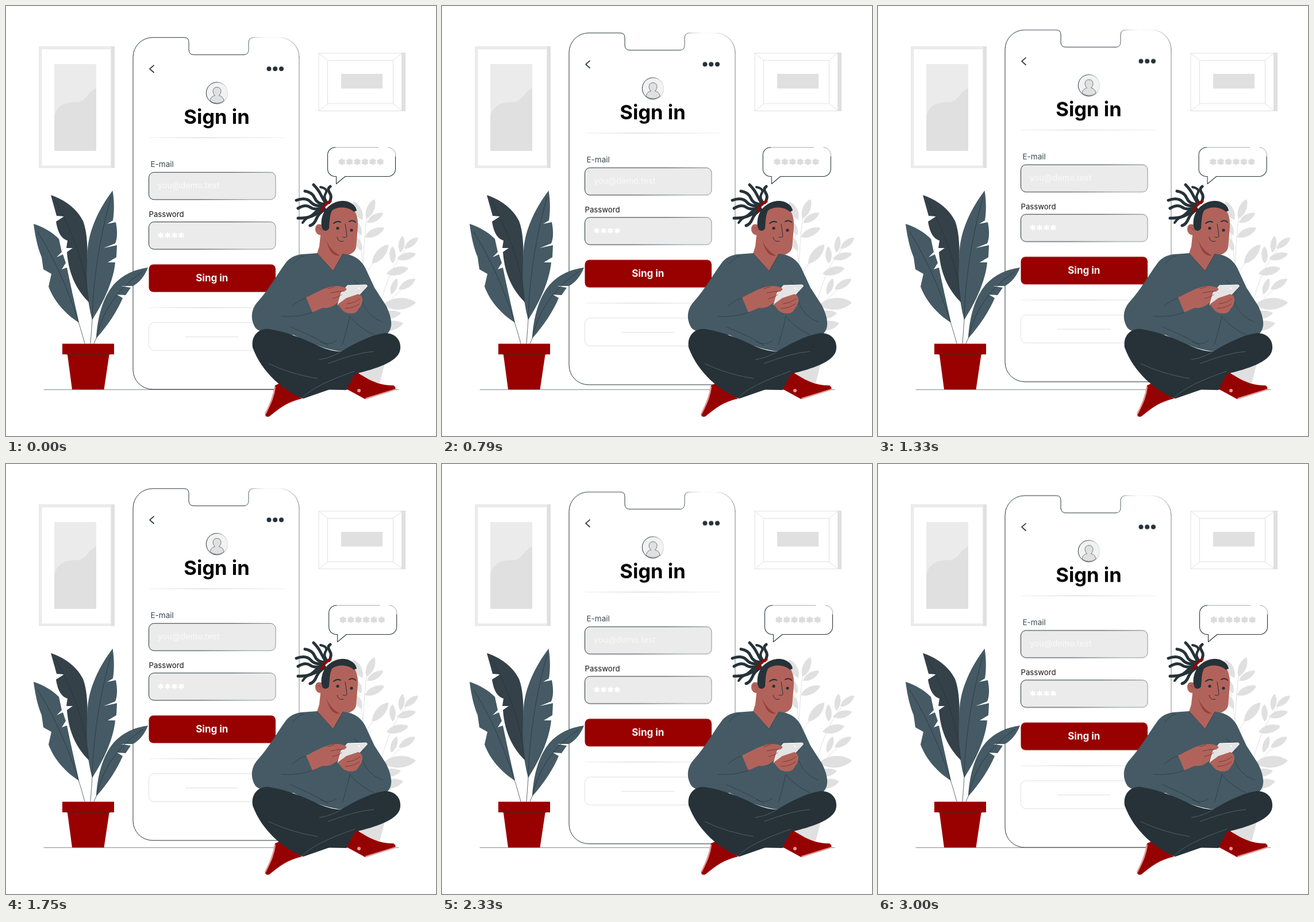
Recreate the animation shown at these times as an HTML page. Size 748 by 748 pixels, loop 3040 ms.

```html
<!DOCTYPE html>
<html lang="en">
<head>
<meta charset="utf-8">
<title>Sign in</title>
<style>
  html, body { margin: 0; width: 100%; height: 100%; overflow: hidden; background: #fff; }
  svg { display: block; width: 748px; height: 748px; font-family: Inter, "Open Sans", sans-serif; }
  .ink { fill: none; stroke: #263238; stroke-linecap: round; stroke-linejoin: round; }
  .thin { stroke-width: .8; }
  .dark { fill: #263238; }
  .slate { fill: #455a64; }
  .red { fill: #900; }
  .skin { fill: #b1635b; }
  .pale { fill: #ebebeb; }
  .grey { fill: #e0e0e0; }
  .rule { fill: none; stroke: #e0e0e0; stroke-width: 1; }
  #device { animation: float 3040ms linear infinite; }
  #bubble { animation: shake 3040ms linear infinite; }
  @keyframes float {
    0% { transform: translateY(-.18px); }
    48.75% { transform: translateY(-14.96px); }
    98.09%, 100% { transform: translateY(0); }
  }
  /* two shakes of 1.5 s each */
  @keyframes shake {
    0%, 48.75%, 98.09%, 100% { transform: translateX(0); }
    4.34%, 43.82%, 53.68%, 93.16% { transform: translateX(-1.5px); }
    9.28%, 38.88%, 58.62%, 88.22% { transform: translateX(3px); }
    14.21%, 24.08%, 33.95%, 63.55%, 73.42%, 83.29% { transform: translateX(-6px); }
    19.14%, 29.01%, 68.49%, 78.36% { transform: translateX(6px); }
  }
</style>
</head>
<body>
<svg viewBox="0 0 748 748">
  <defs>
    <linearGradient id="fadeTop" gradientUnits="userSpaceOnUse" x1="422" y1="0" x2="510" y2="0">
      <stop offset="0" stop-color="#263238"/><stop offset=".15" stop-color="#263238" stop-opacity=".35"/>
      <stop offset=".35" stop-color="#263238" stop-opacity=".04"/><stop offset=".6" stop-color="#263238" stop-opacity=".08"/>
      <stop offset="1" stop-color="#263238" stop-opacity=".75"/>
    </linearGradient>
    <linearGradient id="fadeField" x1="0" y1="0" x2="1" y2=".25">
      <stop offset=".6" stop-color="#263238"/><stop offset="1" stop-color="#263238" stop-opacity=".5"/>
    </linearGradient>
    <linearGradient id="fadeFace" x1="0" y1=".5" x2="1" y2=".4">
      <stop offset=".4" stop-color="#263238"/><stop offset="1" stop-color="#263238" stop-opacity=".1"/>
    </linearGradient>
    <linearGradient id="fadeRule" gradientUnits="userSpaceOnUse" x1="249" y1="0" x2="483" y2="0">
      <stop offset="0" stop-color="#ccc" stop-opacity=".3"/><stop offset=".4" stop-color="#ccc"/>
      <stop offset="1" stop-color="#ccc" stop-opacity=".3"/>
    </linearGradient>
    <path id="star" d="M0-5V5M-4.600-2.600L4.600 2.600M-4.600 2.600L4.600-2.600"/>
  </defs>

  <!-- wall pictures -->
  <path class="grey" d="M57 70h132v212H57z"/>
  <path class="pale" d="M57 70h126v212H57z"/>
  <path fill="#fff" d="M62.500 75.500H182V277.500H62.500z"/>
  <path class="pale" d="M84 101h73v151H84z"/>
  <path class="grey" d="M157 143C146 148 142 158 135 163C124 172 106 162 92 177Q85 184 84 194V252H157z"/>
  <path class="grey" d="M688 81h7v102h-7z"/>
  <path class="rule" d="M544 82H689V182.500H544zM559.500 94.500H673.500V170H559.500zM544 82L559.500 94.500M689 82L673.500 94.500M544 182.500L559.500 170M689 182.500L673.500 170"/>
  <path class="grey" d="M583 118h72v25.500h-72z"/>

  <path class="ink thin" opacity=".75" d="M66 667.300H683"/>

  <g id="device">
    <path fill="#fff" d="M255 55H310Q318 55 318 63V76Q318 85 327 85H414Q422 85 422 76V64Q422 55 431 55H476A34 34 0 0 1 510 89V633A34 34 0 0 1 476 667H255A34 34 0 0 1 221 633V89A34 34 0 0 1 255 55z"/>
    <path class="ink" stroke-width="1" d="M480 667H255A34 34 0 0 1 221 633V89A34 34 0 0 1 255 55H310Q318 55 318 63V76Q318 85 327 85H414"/>
    <path class="ink thin" d="M414 85Q422 85 422 76V64Q422 55 431 55H476A34 34 0 0 1 510 89" style="stroke:url(#fadeTop)"/>
    <path class="ink thin" opacity=".75" d="M510 89V633A34 34 0 0 1 476 667"/>

    <path class="ink" stroke-width="1.700" d="M257 103.500L250 109.500L257 115.700"/>
    <g class="dark"><circle cx="457.500" cy="109.500" r="4"/><circle cx="468.200" cy="109.500" r="4"/><circle cx="479" cy="109.500" r="4"/></g>

    <circle cx="367" cy="151.500" r="18.700" fill="#f2f2f2" stroke="url(#fadeFace)" stroke-width="1"/>
    <path class="grey" stroke="#263238" stroke-width=".6" d="M355 165.500C356 159 359 157 363.500 156C358 151 359 141.500 367 141.500S376 151 370.500 156C375 157 378 159 379 165.500Q367 173.500 355 165.500z"/>
    <text x="366.500" y="205.500" font-size="34.600" font-weight="700" text-anchor="middle">Sign in</text>
    <path d="M249 228.700H483V229.700H249z" fill="url(#fadeRule)"/>

    <text x="251.500" y="280" font-size="13.500" fill="#37474f">E-mail</text>
    <rect class="pale" x="248.500" y="289.500" width="220.500" height="47.500" rx="9" stroke="url(#fadeField)"/>
    <text x="264" y="317.500" font-size="14.500" fill="#fafafa">you@demo.test</text>
    <text x="248.500" y="367" font-size="13.200" fill="#111">Password</text>
    <rect class="pale" x="248.500" y="375.800" width="220.500" height="47.500" rx="9" stroke="url(#fadeField)"/>
    <g id="dots" stroke="#fff" stroke-width="2.400"></g>

    <rect class="red" x="248.500" y="449.700" width="220.500" height="48" rx="8"/>
    <text x="358.300" y="479" font-size="17" font-weight="700" fill="#fff" text-anchor="middle">Sing in</text>
    <path d="M249 524.500H483V525.500H249z" fill="url(#fadeRule)"/>
    <rect class="rule" x="248.500" y="551" width="220.500" height="48.500" rx="9"/>
    <path class="rule" d="M312 575.700H404"/>
  </g>

  <!-- potted plant -->
  <path fill="#344149" d="M78 329C102 337 123 352 134 374C142 394 143 430 141 468L145 516C126 498 109 470 106 428L116 421L105 421L107 408C97 405 90 395 87 375L101 366L88 365C85 353 82 344 78 329z"/>
  <path class="slate" d="M48 379C64 384 80 393 92 405L97 428L88 437L99 432L104 447L97 458L106 455C112 485 119 515 127 551C104 536 84 515 74 488L79 466L65 458L62 437C55 420 51 402 48 379z"/>
  <path class="slate" d="M185.500 321C189 342 188 361 186 373L176 379L191 376C194 391 194 404 190 413L170 421L193 416L192 437L177 446L190 446C187 478 170 515 150 546C140 510 139 470 142 425C144 390 162 352 185.500 321z"/>
  <path class="slate" d="M247 455C241 470 232 481 221 487L200 487L217 490L208 503L193 502L203 508C194 530 177 556 157 578C159 542 168 508 187 485C203 467 224 458 247 455z"/>
  <g class="ink" stroke-width=".7">
    <path d="M55 393C85 440 115 505 137 587"/>
    <path d="M85 338C115 390 138 450 144 515"/>
    <path d="M183 332C163 400 151 480 150 546L147 587"/>
    <path d="M238 462C195 490 168 530 157 578L153 587"/>
  </g>
  <path class="red" d="M106 600H180.500L170.500 667H115z"/>
  <path class="red" d="M98 587.500H188V606H98z"/>
  <path class="ink thin" d="M106 606H181"/>

  <!-- pale plant -->
  <path class="grey" d="M612 618H660L650 656H622z"/>
  <path class="rule" d="M632 640C618 560 616 440 630 350M640 600C645 520 665 450 709 408M642 570C650 530 675 498 706 482M622 460C617 420 615 390 606 360M624 470Q640 440 664 422"/>
  <g id="leaves" class="grey"></g>

  <g id="bubble">
    <path fill="#fff" d="M572.500 246H664.500A13 13 0 0 1 677.500 259V283.500A13 13 0 0 1 664.500 296.500H590L574.500 309.500V296.500H572.500A13 13 0 0 1 559.500 283.500V259A13 13 0 0 1 572.500 246z"/>
    <path class="ink" stroke-width="1.100" d="M677.500 262V283.500A13 13 0 0 1 664.500 296.500H590L574.500 309.500V296.500H572.500A13 13 0 0 1 559.500 283.500V259A13 13 0 0 1 572.500 246"/>
    <path class="ink thin" opacity=".55" d="M572.500 246H648M665 246A13 13 0 0 1 677.500 262"/>
    <g id="secret" stroke="#dcdcdc" stroke-width="3.300"></g>
  </g>

  <!-- seated man -->
  <g class="ink" stroke-width="5">
    <path d="M557 345Q551 335 547 327T535 311"/>
    <path d="M560 343Q551 334 556 326T547 315" stroke-width="4"/>
    <path d="M562 342Q568 332 563 325T564 314"/>
    <path d="M554 345Q541 344 537 334T520 322"/>
    <path d="M553 347Q538 350 530 341T505 338"/>
    <path d="M553 350Q537 356 529 350T508 352"/>
    <path d="M553 352Q542 354 535 362T508 369"/>
    <path d="M555 354Q544 360 540 370T529 382"/>
    <path d="M554 353Q536 366 529 367T516 377" stroke-width="4"/>
  </g>

  <path class="skin" d="M549 380L545 418L541 431L569 462L588 432z"/>
  <path class="skin" d="M552 370C557 351 577 344 597 348C608 353 613 367 612 385L609 420C607 431 592 437 576 433C563 428 555 410 552 393z"/>
  <path fill="#8f3a32" d="M557 407C562 420 571 429 581 434C571 436 563 430 557 407z" opacity=".8"/>
  <path class="skin" d="M552 383C546 377 538 379 538 388C538 396 545 401 553 397z"/>
  <path class="ink thin" d="M542 386Q547 384 549 391" opacity=".5"/>
  <path class="dark" d="M549 384C546 361 560 342 583 339C597 338 609 346 610 356L605 358C594 348 576 349 567 356C563 364 563 374 562 387Q557 394 551 389z"/>
  <path d="M549 358Q553 344 566 339" fill="none" stroke="#900" stroke-width="4.500"/>
  <g class="ink">
    <path d="M570 378Q576 373 582 376M597 375Q603 371 608 376" stroke-width="2"/>
    <path d="M590 379Q592 392 593 401Q590 404 586 402M576 402Q578 412 587 409" stroke-width="1"/>
  </g>
  <circle class="dark" cx="577" cy="386.500" r="2.600"/><circle class="dark" cx="601" cy="390" r="2.600"/>

  <path class="red" d="M479 655L515 683C490 688 474 701 458 714Q451 716 451 710C457 696 464 681 468 660z"/>
  <path d="M468 662C466 682 457 697 451 710" fill="none" stroke="#e29a97" stroke-width="2.500"/>
  <path class="red" d="M608 635L592 666L625 684L676 668Q680 664 674 660C652 661 630 651 608 635z"/>
  <path d="M625 683L677 667" stroke="#e29a97" stroke-width="2"/>
  <g class="ink" stroke-width="1" stroke-dasharray="3 4" opacity=".8">
    <path d="M475 669L497 686M470 680L487 691M464 691L474 699"/>
    <path d="M611 645L605 671M622 650L617 676M634 656L628 680M646 660L640 676M657 662L652 672"/>
  </g>
  <circle cx="490" cy="663" r="3" fill="#e29a97"/><circle cx="614" cy="669" r="3" fill="#e29a97"/>

  <path class="slate" d="M541 430L569 461L586 431C604 432 620 441 628 462L641 490L661 521C672 543 674 561 662 571L583 601Q545 596 500 572C472 573 445 571 434 560C424 545 426 526 440 512C457 493 473 465 485 449Q494 435 513 432z"/>
  <path class="dark" d="M429 594C426 573 440 560 458 562C490 567 520 580 545 592Q566 601 583 601C605 588 632 573 658 569C677 568 690 582 685 601C679 619 645 631 607 640L592 668L563 667L517 683C484 670 445 638 429 594z"/>
  <path d="M457 622Q497 641 542 648M516 681Q535 660 607 635M583 601Q566 612 545 615M560 622Q610 603 640 601" fill="none" stroke="#52656f" stroke-width=".9"/>

  <path class="ink thin" d="M541 430L569 461L586 431M499 449Q512 434 518 435M480 540Q510 542 536 532M521 508Q508 512 498 522M495 558Q540 577 560 590M546 584Q562 592 575 582M598 540Q592 568 585 589M598 540Q614 560 640 572M620 515Q630 541 655 550M605 477Q616 485 622 500" opacity=".75"/>
  <path class="skin" d="M522 507C537 500 548 493 562 489C570 486 581 487 589 491L583 498C588 505 582 514 574 518C567 524 560 526 551 525L533 533z"/>
  <path d="M594 486L626 485Q630 486 627 489L613 504L592 509L577 520L583 499z" fill="#e4e4e4" stroke="#fff" stroke-width="1"/>
  <circle cx="614" cy="491" r="1.500" fill="#fff"/>
  <path class="skin" d="M577 519L592 508L613 501C621 504 622 513 617 522L610 532C602 537 591 535 585 529z"/>
  <path class="skin" d="M562 490Q576 484 590 490Q596 494 587 496L570 499z"/>
  <g fill="none" stroke="#6f302b" stroke-width=".8" stroke-linecap="round">
    <path d="M565 499Q579 496 589 496M568 509Q580 506 584 502M593 518Q607 517 616 509M590 526Q604 526 615 518M560 492L571 488"/>
  </g>
</svg>
<script>
  const NS = "http://www.w3.org/2000/svg";
  const add = (id, tag, attrs) => {
    const node = document.createElementNS(NS, tag);
    for (const key in attrs) node.setAttribute(key, attrs[key]);
    document.getElementById(id).append(node);
  };

  const stars = (id, count, x, y, step, size) => {
    for (let i = 0; i < count; i++)
      add(id, "use", { href: "#star", transform: `translate(${x + i * step} ${y}) scale(${size})` });
  };
  stars("dots", 4, 269.2, 399, 11.9, .98);
  stars("secret", 6, 584.2, 271, 13.4, 1.12);

  // base x, base y, tip x, tip y
  const leaves = [
    [627, 370, 641, 336], [628, 377, 656, 360], [624, 402, 658, 386],
    [620, 372, 604, 340], [618, 399, 608, 374], [619, 426, 606, 400],
    [637, 448, 665, 415], [686, 429, 690, 400], [693, 422, 717, 403],
    [673, 448, 672, 418], [680, 440, 713, 431], [662, 466, 700, 456],
    [670, 502, 680, 474], [683, 493, 712, 475], [656, 520, 713, 516],
    [648, 540, 687, 534], [644, 561, 691, 552]
  ];
  const width = .27;
  for (const [x, y, tx, ty] of leaves) {
    const dx = tx - x, dy = ty - y;
    const bend = (at, side) => `${x + dx * at - dy * width * side} ${y + dy * at + dx * width * side}`;
    add("leaves", "path", {
      d: `M${x} ${y}C${bend(.3, 1)} ${bend(.8, .75)} ${tx} ${ty}C${bend(.8, -.75)} ${bend(.3, -1)} ${x} ${y}z`
    });
  }
</script>
</body>
</html>
```
